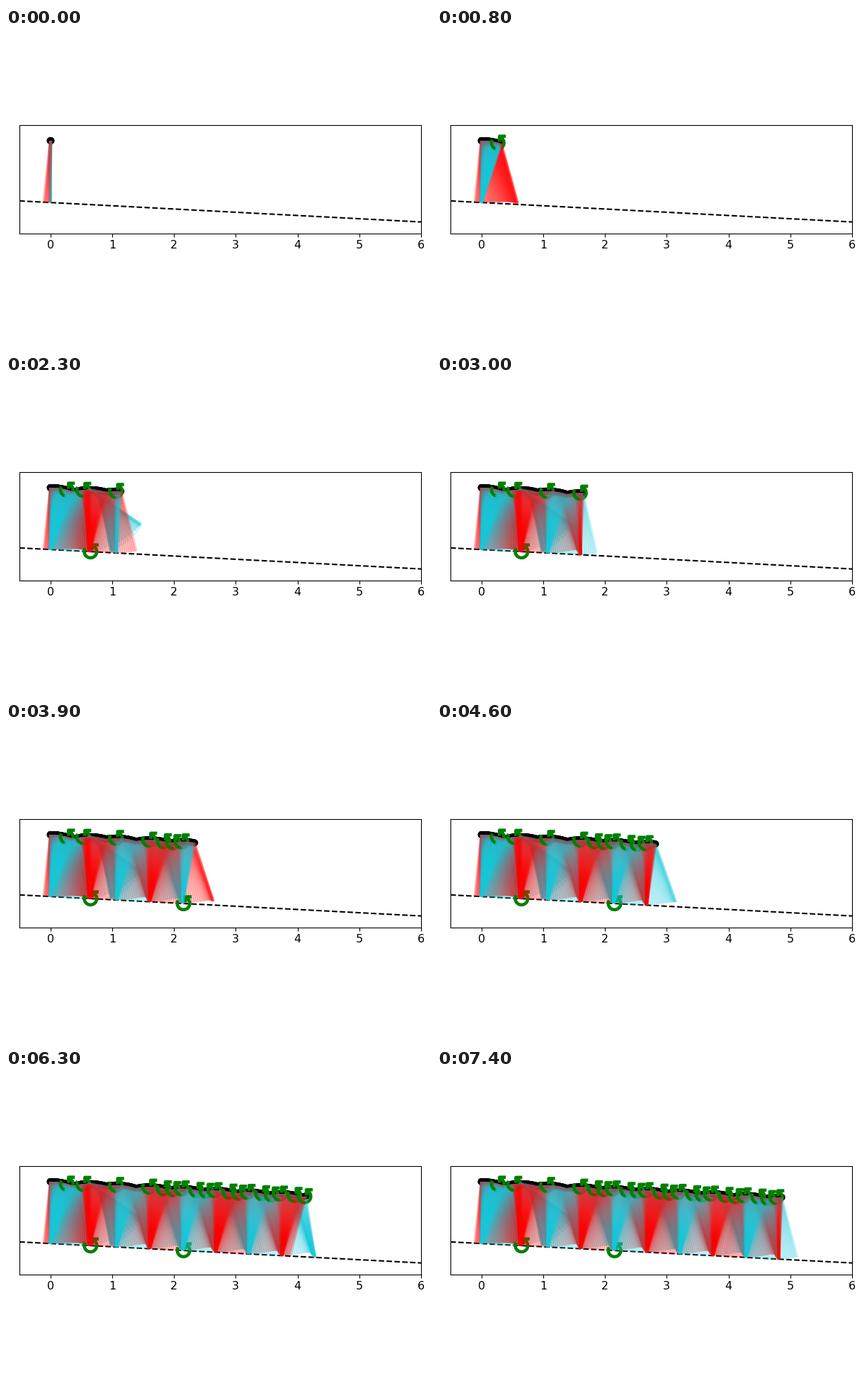
These frames come from a looping animation (600x450 px, 7.5 s). A matplotlib script:

```python
import numpy as np
import matplotlib.pyplot as plt
from matplotlib.animation import FuncAnimation
from matplotlib.collections import PathCollection
from matplotlib.path import Path

FRAMES, SUB = 75, 8          # pictures per loop, poses added per picture
UNIT = 567 / 6.5             # pixels per data unit
SLOPE = np.tan(np.radians(3))
STRIDE = 0.535

RED = (1, 0, 0, 0.22)
CYAN = (0.09, 0.79, 0.86, 0.22)
GREEN = (0, 0.5, 0, 1)
CLEAR = (0, 0, 0, 0)

# even footholds along the ramp, after a longer first step
FEET = STRIDE * np.arange(11)
FEET[1] += 0.1
# hip position where the weight moves to the next foot
SWITCH = (FEET[:-1] + FEET[1:]) / 2 + SLOPE * 0.96

# hip travel: (picture number, x)
HIP_KEYS = np.array([(0, 0), (1, .01), (17, .65), (31, 1.65), (40, 2.345),
                     (53, 3.24), (64, 4.145), (75, 4.87)])


def ground(x):
    return -SLOPE * x


def bump(p, mid, width):
    return np.exp(-((p - mid) / width) ** 2 / 2)


def lean(foot, hip):
    return np.degrees(np.arcsin(np.clip(foot - hip, -1, 1)))


def swing_angle(n, hx, q):
    """Swing leg angle in degrees: catch up, overshoot, settle."""
    land = lean(FEET[n + 1], SWITCH[n])
    if n == 0:
        start, u, extra = -6, 1 - (1 - min(q / 10, 1)) ** 3, 0
    else:
        p = (hx - SWITCH[n - 1]) / (SWITCH[n] - SWITCH[n - 1])
        start = lean(FEET[n - 1], SWITCH[n - 1])
        u = np.sin(np.pi / 2 * min(p / 0.6, 1)) ** 2
        # the second step kicks far out
        extra = 48 * bump(p, .5, .11) if n == 1 else 7 * bump(p, .65, .15)
    return start + (land - start) * u + extra


def pose(q):
    """Hip, stance foot, swing foot and step number at picture time q."""
    hx = np.interp(q, *HIP_KEYS.T)
    n = int(np.searchsorted(SWITCH, hx, side="right"))
    fx = FEET[n]
    hy = ground(fx) + np.sqrt(1 - (hx - fx) ** 2)
    a = np.radians(swing_angle(n, hx, q))
    return (hx, hy), (fx, ground(fx)), (hx + np.sin(a), hy - np.cos(a)), n


def turn_shape():
    """Counter-clockwise arrow with an open corner as its head, in pixels."""
    t = np.radians(np.linspace(150, 415, 40))
    arc = 8.8 * np.column_stack([np.cos(t), np.sin(t)])
    head = [(2.5, 8), (11.5, 9.4), (2.5, 9.4), (2.5, 1.5)]
    codes = [Path.LINETO] * (len(arc) + len(head))
    codes[0] = codes[-3] = Path.MOVETO
    return np.vstack([arc, head]) / UNIT, codes


TURN, TURN_CODES = turn_shape()


def turn_marks():
    """(hip x that triggers it, foothold or None for the hip), in order."""
    steps = np.arange(1, 10)
    late = steps[3:]
    at_hip = 0.53 * np.concatenate([[.5], steps, late - .25, late - .55])
    marks = [(x, None) for x in at_hip]
    marks += [(FEET[n] + .15, FEET[n]) for n in (1, 4)]
    return sorted(marks, key=lambda m: m[0])


def build():
    dots, strokes, counts = [], [], []
    marks = turn_marks()
    for k in range(FRAMES * SUB):
        hip, stance, swing, n = pose(k / SUB)
        red, cyan = (swing, stance) if n % 2 == 0 else (stance, swing)
        dots.append(Path.circle(hip, 5 / UNIT))
        strokes.append((Path([hip, cyan]), CYAN, 3))
        strokes.append((Path([hip, red]), RED, 3))
        while marks and hip[0] >= marks[0][0]:
            foot = marks.pop(0)[1]
            at = hip if foot is None else (foot + .015, ground(foot))
            strokes.append((Path(TURN + at, TURN_CODES), GREEN, 3.3))
        if k % SUB == SUB - 1:
            counts.append(len(strokes))
    return dots, strokes, counts


dots, strokes, counts = build()
paths, colors, widths = zip(*strokes)

fig = plt.figure(figsize=(6, 4.5), dpi=100, facecolor="white")
ax = fig.add_axes([19 / 600, 160.2 / 450, 567 / 600, 1.75 * UNIT / 450])
ax.set_xlim(-0.5, 6)
ax.set_ylim(-0.5, 1.25)
ax.set_xticks(range(7))
ax.set_yticks([])
ax.tick_params(axis="x", labelsize=11.4, pad=2.9)

ramp = np.array([-0.5, 6])
ax.plot(ramp, ground(ramp), "k--", lw=1.5, zorder=1)

track = PathCollection(dots[:SUB], facecolors="black", edgecolors="none",
                       zorder=2)
trail = PathCollection(paths[:counts[0]], facecolors=CLEAR, edgecolors=colors,
                       linewidths=widths, zorder=3)
ax.add_collection(track, autolim=False)
ax.add_collection(trail, autolim=False)


def update(i):
    track.set_paths(dots[:(i + 1) * SUB])
    trail.set_paths(paths[:counts[i]])
    return track, trail


anim = FuncAnimation(fig, update, frames=FRAMES, interval=100,
                     init_func=lambda: update(0), repeat=True, repeat_delay=0)
plt.show()
```
